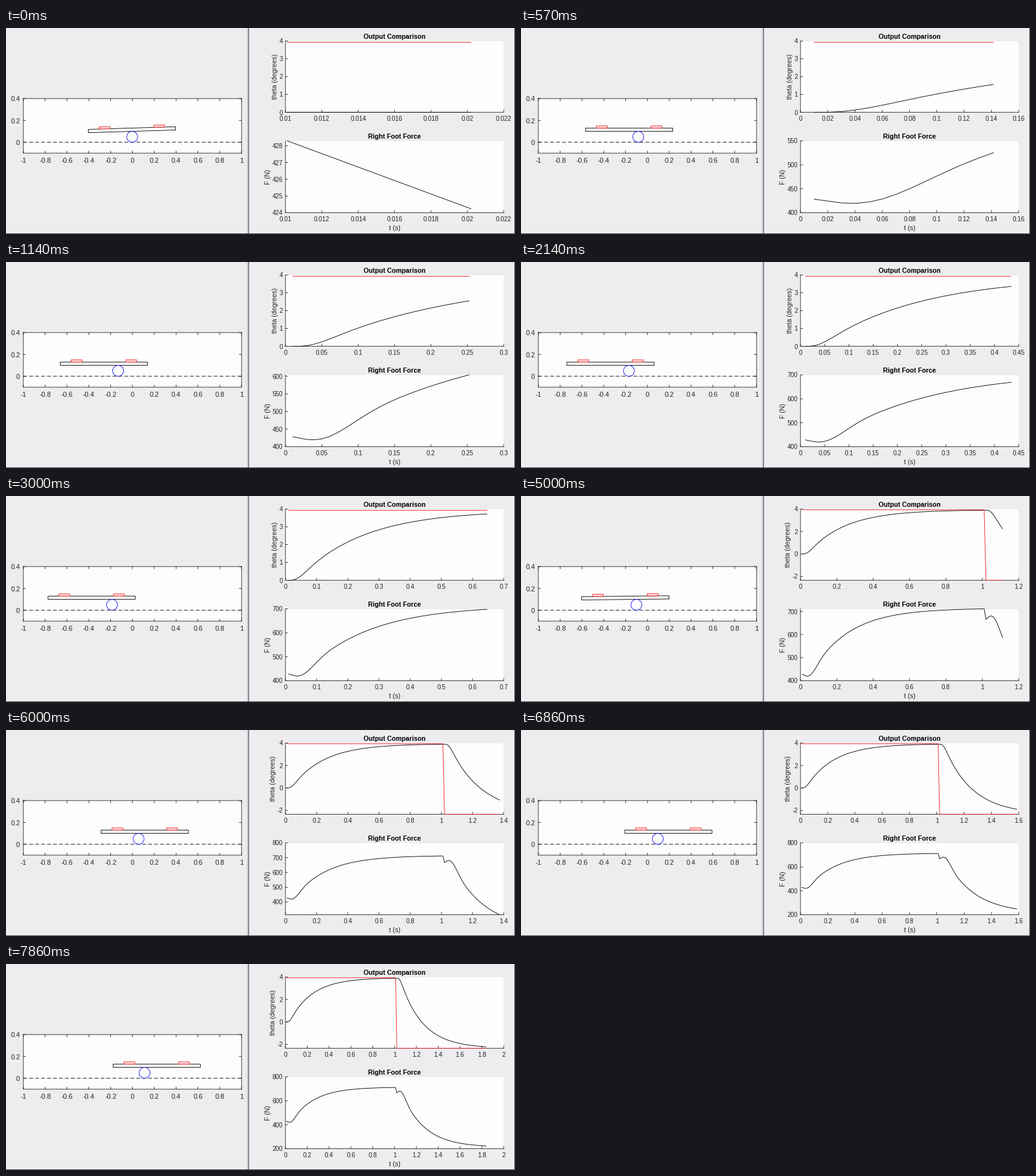
These frames come from a looping animation (800x324 px, 8000 ms). A matplotlib script:

```python
import math
import numpy as np
import matplotlib.pyplot as plt
from matplotlib.animation import FuncAnimation
from matplotlib.patches import Circle, Polygon, Rectangle

W, H, DPI = 800, 324, 100
STEPS, SUB, LOOP = 56, 4, 8000   # pictures per loop, ticks per picture, ms
PX = 72 / DPI
INK, RED, PAPER = "#262626", "#f01818", "#fefdfe"
DT = 1 / 99
STEP_AT = 101            # sample at which the set point drops
HIGH, LOW = 3.93, -2.35  # set points in degrees

plt.rcParams["font.family"] = "Liberation Sans"
fig = plt.figure(figsize=(W / DPI, H / DPI), dpi=DPI, facecolor="#eeecef")
ax = fig.add_axes([0, 0, 1, 1])
ax.set_xlim(0, W)
ax.set_ylim(H, 0)
ax.axis("off")


# ---- model: tilt angle and foot force after a step of the set point ----

def rise(tau):
    tau = np.maximum(tau, 0)
    slow = 1.14 * np.exp(-4.86 * tau)
    fast = np.exp(-45 * tau) * (0.14 * np.cos(40 * tau) + 0.019 * np.sin(40 * tau))
    return 1 - slow + fast


def kick(tau):
    on = tau > -1e-9
    tau = np.maximum(tau, 0)
    return on * np.exp(-9 * tau - 100 * tau ** 2) * np.cos(36 * tau)


def respond(shape, k):
    k = np.asarray(k, float)
    return HIGH * shape((k - 1) * DT) + (LOW - HIGH) * shape((k - STEP_AT) * DT)


def theta(k):
    return np.round(respond(rise, k), 9)


def force(k):
    return 400 + 80 * theta(k) + 7.2 * respond(kick, k)


def last_sample(step):
    return int(round(np.interp(step, [0, 8, 15, 27, 35, 42, 55],
                               [2, 25, 43, 84, 110, 136, 182])))


# ---- drawing helpers, all in pixels ----

def text(x, y, s, size, ha="center", **kw):
    return ax.text(x, y + 0.345 * size, s, fontsize=size * PX, ha=ha,
                   va="baseline", color=kw.pop("color", INK), **kw)


def side_text(x, y, s):
    return ax.text(x, y, s, fontsize=10.5 * PX, rotation=90, ha="center",
                   va="center", color=INK)


def line(xs, ys, color=INK, width=0.85, **kw):
    return ax.plot(xs, ys, color=color, lw=width * PX, snap=False, **kw)[0]


def box(x, y, w, h, color):
    ax.add_patch(Rectangle((x, y), w, h, fc=color, ec="none", zorder=0.5))


def outline(face, edge):
    return ax.add_patch(Polygon([(0, 0)] * 4, fc=face, ec=edge, lw=0.85 * PX,
                                snap=False, zorder=3))


def nice(a, b, most):
    """Smallest 1-2-5 step that covers a..b in at most `most` intervals."""
    p = math.floor(math.log10(b - a)) - 2
    while True:
        for m in (1, 2, 5):
            s = m * 10.0 ** p
            lo, hi = math.floor(a / s + 1e-9), math.ceil(b / s - 1e-9)
            if hi - lo <= most:
                return s, lo, hi
        p += 1


def limits(a, b, most, loose):
    """Axis limits and ticks; a far outer tick is dropped unless loose."""
    s, i, j = nice(a, b, most)
    lo, hi = i * s, j * s
    if not loose:
        if a - lo > 0.5 * s:
            lo = a
        if hi - b > 0.5 * s:
            hi = b
        if 300 < a < 400:
            lo, hi = a, 800
    ticks = [n * s for n in range(i, j + 1) if lo - 1e-9 <= n * s <= hi + 1e-9]
    return lo, hi, ticks


# ---- left view: board on a roller ----

LX0, LX1, LY0, LY1 = 27.2, 370.2, 111, 196.9
UNIT = (LX1 - LX0) / 2


def sx(x):
    return LX0 + (x + 1) * UNIT


def sy(y):
    return LY1 - (y + 0.1) * (LY1 - LY0) / 0.5


box(LX0, LY0, LX1 - LX0, LY1 - LY0, PAPER)
line([LX0, LX1, LX1, LX0, LX0], [LY0, LY0, LY1, LY1, LY0])
for n in range(-5, 6):
    x = sx(n / 5)
    line([x, x], [LY1, LY1 - 3.5])
    line([x, x], [LY0, LY0 + 3.5])
    text(x, 208.5, f"{n / 5:g}", 10.7)
for v in (0, 0.2, 0.4):
    line([LX0, LX0 + 3.5], [sy(v)] * 2)
    line([LX1, LX1 - 3.5], [sy(v)] * 2)
    text(22, sy(v) + 0.8, f"{v:g}", 10.7, "right")
line([LX0, LX1], [sy(0)] * 2, "black", dashes=(7, 4))

roller = ax.add_patch(Circle((0, 0), 0.05 * UNIT, fill=False, ec="#1010f0",
                             lw=0.85 * PX, zorder=4))
board = outline("white", "black")
feet = [outline("#ffe4e4", RED) for _ in range(2)]


def place(k):
    shift = -0.1 * float(theta(k + 1))
    mid = shift / 2
    tilt = math.radians(0.52 * float(respond(kick, k)))
    c, s = math.cos(tilt), math.sin(tilt)

    def block(u, v, w, h):
        pts = [(u - w / 2, v), (u + w / 2, v), (u + w / 2, v + h), (u - w / 2, v + h)]
        return [(sx(mid + p * c - q * s), sy(0.1 + p * s + q * c)) for p, q in pts]

    off = shift - mid
    roller.center = (sx(mid), sy(0.05))
    board.set_xy(block(off, 0, 0.8, 0.03))
    for foot, side in zip(feet, (-0.25, 0.25)):
        foot.set_xy(block(off + side, 0.03, 0.1, 0.02))


# ---- window edges ----

for x, shade in ((378, "#e2e2e4"), (379, "#d0d0d4"), (380, "#b0b2b8"), (381, "#5c626e")):
    box(x, 0, 1, H, shade)
box(0, 323, W, 1, "#4a4a4c")
box(799, 0, 1, H, "#4a4a4c")

# ---- right view: two charts ----

CX0, CX1, LABEL_X, SMALL = 439.2, 782.2, 435, 9.9
TOP, BOTTOM = (20.5, 132.6), (177.5, 290.5)
for (y0, y1), title in ((TOP, "Output Comparison"), (BOTTOM, "Right Foot Force")):
    box(CX0, y0, CX1 - CX0, y1 - y0, PAPER)
    line([CX0, CX0, CX1], [y0, y1, y1])
    text(611, y0 - 7.2, title, 10.4, weight="bold", color="black")
text(611, 314.5, "t (s)", 10.5)

live = []


def chart(span, name, t, curves):
    y0, y1 = span
    a = min(c.min() for c, _ in curves)
    b = max(c.max() for c, _ in curves)
    xlo, xhi, xticks = limits(t[0], t[-1], 10, True)
    ylo, yhi, yticks = limits(a, b, 5, False)

    def px(v):
        return CX0 + (v - xlo) / (xhi - xlo) * (CX1 - CX0)

    def py(v):
        return y1 - (v - ylo) / (yhi - ylo) * (y1 - y0)

    for v in xticks:
        live.append(line([px(v)] * 2, [y1, y1 - 3.5]))
        live.append(text(px(v), y1 + 10.3, f"{round(v, 6):g}", SMALL))
    widest = 0
    for v in yticks:
        label = f"{round(v, 6):g}"
        ems = sum(0.556 if ch.isdigit() else 0.333 for ch in label)
        widest = max(widest, ems * SMALL)
        live.append(line([CX0, CX0 + 3.5], [py(v)] * 2))
        live.append(text(LABEL_X, py(v) + 0.5, label, SMALL, "right"))
    # the axis name keeps clear of the widest tick label
    live.append(side_text(LABEL_X - widest - 6.3, (y0 + y1) / 2, name))
    for c, color in curves:
        live.append(line(px(t), py(c), color))


def draw(tick):
    while live:
        live.pop().remove()
    # each picture comes up one tick ahead of its even share of the loop
    n = last_sample(min((tick + 1) // SUB, STEPS - 1))
    k = np.arange(1, n + 1)
    t = k * DT
    goal = np.where(k < STEP_AT, HIGH, LOW)
    chart(TOP, "theta (degrees)", t, [(theta(k), "black"), (goal, RED)])
    chart(BOTTOM, "F (N)", t, [(force(k), "black")])
    place(n)
    return []


anim = FuncAnimation(fig, draw, frames=STEPS * SUB, init_func=lambda: draw(0),
                     interval=LOOP / (STEPS * SUB), repeat=True, repeat_delay=0,
                     blit=False)
plt.show()
```
